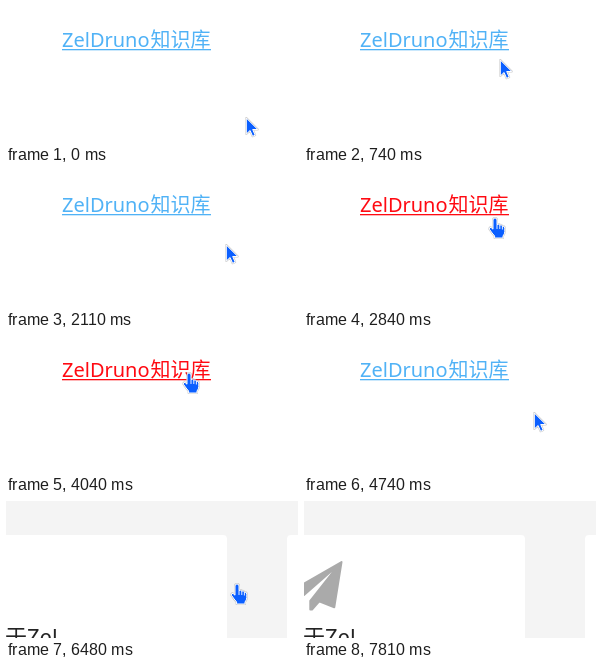
Animation of 292 by 137 pixels, one loop 8.82 s. Source, as an HTML page:

```html
<!DOCTYPE html>
<html lang="zh-CN">
<head>
<meta charset="utf-8">
<title>Link hover</title>
<style>
  html, body { margin: 0; width: 100%; height: 100%; overflow: hidden; background: #fff; }
  svg { display: block; width: 292px; height: 137px; }
  text { font-family: "Noto Sans", "Open Sans", "Noto Sans CJK SC", "Noto Sans CJK", sans-serif; }
  #link { font-size: 20px; }
  #title { font-size: 22px; font-weight: 500; fill: #242424; }
  .cjk { font-family: "Noto Sans CJK SC", "Noto Sans CJK", sans-serif; }
  .pointer { fill: #0b5fff; stroke: #fff; stroke-width: 1; stroke-linejoin: round; }
  .edge { fill: none; stroke: #555; stroke-opacity: .3; stroke-width: 2; stroke-linejoin: round; }
</style>
</head>
<body>
<svg viewBox="0 0 292 137">
  <defs>
    <path id="arrowShape" d="M.3 1V17L4.1 13.5L6.6 19.3L9.2 18.2L6.7 12.5H11.8Z"/>
    <path id="handShape" d="M-2 2Q-2 0 0 0Q2 0 2 2V6.5Q3.5 5.6 4.8 7Q6.4 6.4 7.4 8Q9.8 7.8 9.8 10.2V13.4Q9.8 16 8 18V20H-.4V18Q-2.8 15.4 -5.6 11.2Q-5.8 9 -4 9.4L-2 11.2Z"/>
  </defs>

  <g id="home">
    <rect width="292" height="137" fill="#fff"/>
    <g id="link">
      <text x="56" y="41">ZelDruno</text>
      <text class="cjk" x="144.5" y="41.3">知识库</text>
      <rect x="56" y="43" width="149" height="1.3"/>
    </g>
  </g>

  <rect id="blank" width="292" height="137" fill="#1d1d1d"/>

  <g id="page">
    <rect width="292" height="137" fill="#f4f4f4"/>
    <rect x="-100" y="34" width="321" height="200" rx="4" fill="#fff"/>
    <rect x="281" y="34" width="300" height="200" rx="4" fill="#fff"/>
    <path id="plane" fill="#aaa" stroke="#aaa" stroke-width="2" stroke-linejoin="round"
      d="M37.5 61L-11 89L0 94L28 69.5Q30 69 29 71L6.3 99.8V108.5L8 108.5L15.2 100.3L30.3 106.2Z"/>
    <g id="title">
      <text class="cjk" x="-1" y="144">于</text>
      <text x="21" y="144">Zel</text>
    </g>
  </g>

  <g id="cursor">
    <g id="arrow"><use href="#arrowShape" class="edge"/><use href="#arrowShape" class="pointer"/></g>
    <g id="hand">
      <use href="#handShape" class="edge"/><use href="#handShape" class="pointer"/>
      <path d="M2 6.5V11M4.8 7V11M7.4 8V11.5" stroke="#fff" stroke-width=".9" fill="none"/>
    </g>
  </g>
</svg>
<script>
const LOOP = 8820;
const $ = id => document.getElementById(id);
const linear = u => u;
const smooth = u => u * u * (3 - 2 * u);
const slowing = u => 1 - (1 - u) ** 1.58;

// first step, last step, number of steps, end x, end y, easing
const moves = [
  [390, 950, 9, 180, 33, smooth],
  [1550, 2240, 11, 223, 76, slowing],
  [2700, 2840, 3, 191, 47, linear],
  [2910, 3120, 4, 182, 28, slowing],
  [3380, 3510, 2, 170, 20, linear],
  [4040, 4040, 1, 183, 37, linear],
  [4109, 4870, 12, 233, 78, slowing],
  [4940, 4940, 1, 232, 82, linear],
  [6480, 6480, 1, 231, 83, linear],
  [7400, 7810, 7, 272, 141, smooth]
];

function cursorAt(t) {
  let x = 240, y = 111;
  for (const [from, to, count, endX, endY, ease] of moves) {
    if (t < from) break;
    const gap = count > 1 ? (to - from) / (count - 1) : 1;
    const step = Math.min(count, Math.floor((t - from) / gap + 0.01) + 1);
    const p = ease(step / count);
    x += (endX - x) * p;
    y += (endY - y) * p;
  }
  return [Math.round(x), Math.round(y)];
}

const show = (id, on) => $(id).setAttribute("display", on ? "inline" : "none");

function draw(t) {
  const [x, y] = cursorAt(t);
  const home = t < 4940;
  const page = t >= 6350;
  const over = home && x >= 56 && x <= 205 && y >= 20 && y <= 48;
  const hand = over || t >= 6480;

  show("home", home);
  show("blank", !home && !page);
  show("page", page);
  show("title", t >= 6480);
  show("plane", t >= 6550);
  show("hand", hand);
  show("arrow", !hand);
  show("cursor", t < 7810);
  $("link").setAttribute("fill", over ? "#ff0a12" : "#50b2f6");
  $("cursor").setAttribute("transform", `translate(${x} ${y})`);
}

const start = performance.now();
function tick() {
  draw((performance.now() - start) % LOOP);
  requestAnimationFrame(tick);
}
draw(0);
requestAnimationFrame(tick);
</script>
</body>
</html>
```
